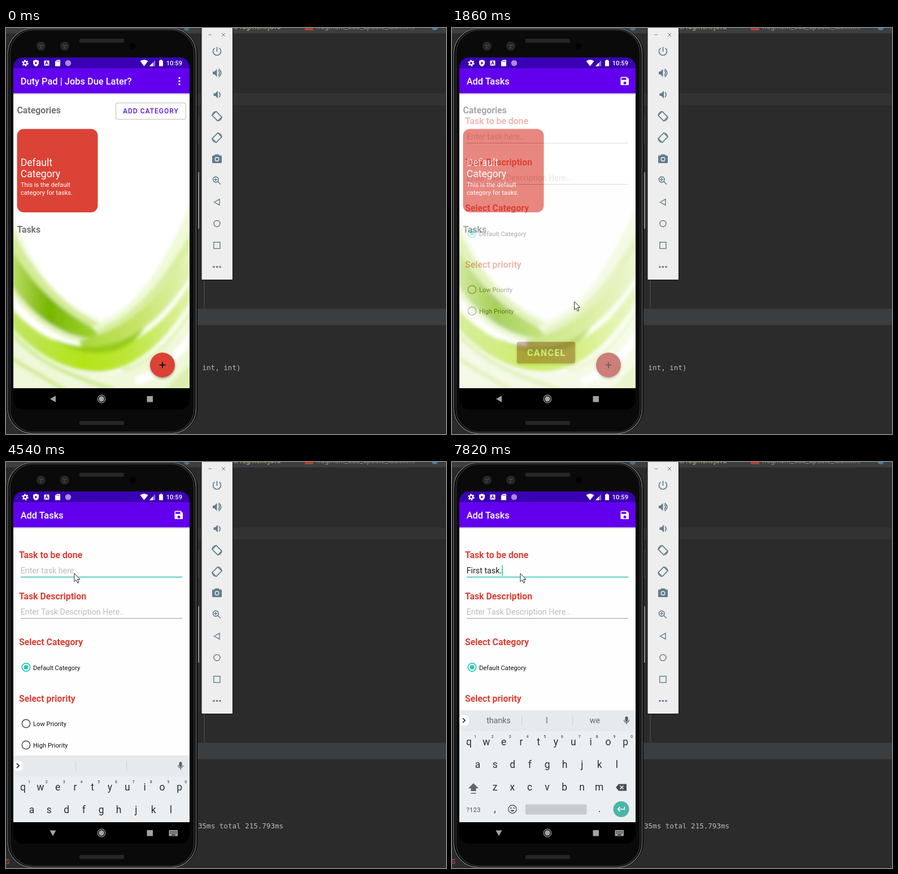
Animation of 779x718 px, one loop 8 s. Source, as an HTML page:

```html
<!DOCTYPE html>
<html lang="en">
<head>
<meta charset="utf-8">
<title>Task form demo</title>
<style>
html, body { margin: 0; width: 100%; height: 100%; overflow: hidden; background: #2b2b2b; }
svg { display: block; width: 779px; height: 718px; font-family: Roboto, sans-serif; }
text { white-space: pre; }
.mono { font: 12.55px "DejaVu Sans Mono", monospace; fill: #b4bcc0; }
.title { font-size: 16.4px; font-weight: 500; fill: #fff; }
.head { font-size: 15.84px; font-weight: 700; }
.field { font-size: 14.26px; }
.small { font-size: 11.2px; }
.hint { fill: #bdbdbd; }
.mid { text-anchor: middle; }
.line { fill: none; stroke-width: 1.7; }
</style>
</head>
<body>
<svg viewBox="0 0 779 718">
  <defs>
    <clipPath id="screen"><rect x="13" y="52" width="312" height="623" rx="17"/></clipPath>
    <clipPath id="content"><rect x="13" y="115" width="312" height="522"/></clipPath>
    <filter id="soft" x="-20%" y="-20%" width="140%" height="140%"><feGaussianBlur stdDeviation="3"/></filter>
    <filter id="shade" x="-30%" y="-30%" width="160%" height="170%"><feDropShadow dx="0" dy="2" stdDeviation="2" flood-opacity=".35"/></filter>
    <linearGradient id="bowl"><stop stop-color="#c2e46a"/><stop offset=".4" stop-color="#b3e418"/><stop offset=".65" stop-color="#bce63a"/><stop offset="1" stop-color="#e2f3b4"/></linearGradient>
    <linearGradient id="leaf"><stop stop-color="#bfe070"/><stop offset=".45" stop-color="#78b600"/><stop offset="1" stop-color="#a4d536"/></linearGradient>
    <linearGradient id="wing"><stop stop-color="#a9d636"/><stop offset=".5" stop-color="#c6e468"/><stop offset="1" stop-color="#e6f4bd"/></linearGradient>
    <linearGradient id="barShade" x2="0" y2="1"><stop stop-color="#000" stop-opacity=".22"/><stop offset="1" stop-color="#000" stop-opacity="0"/></linearGradient>
    <g id="turn"><rect x="-5" y="-7" width="10" height="14" transform="rotate(-45)"/><path d="M-8.500-2A9 9 0 0 1-3-8.300M8.500 2A9 9 0 0 1 3 8.300" stroke-width="1.300"/></g>
  </defs>

  <!-- editor -->
  <rect width="779" height="718" fill="#2b2b2b"/>
  <rect width="779" height="9.5" fill="#3c3f41"/>
  <g font-size="12.5" fill="#8b8f92">
    <circle cx="320" cy="0" r="5" fill="#4d7186"/>
    <text x="385" y="2" fill="#b5b46c">StatFragment.java</text>
    <rect x="529" y="-3" width="15" height="7" rx="1" fill="#b8402f"/>
    <text x="549" y="2">fragment_add_update_task.xml</text>
    <circle cx="759" cy="-2" r="6" fill="#4d7ea0"/>
  </g>
  <rect x="330" y="116" width="449" height="21" fill="#323232"/>
  <rect x="330" y="496.500" width="449" height="29" fill="#3b3e41"/>
  <path d="M351 446V496" stroke="#555"/>
  <text id="logA" class="mono" x="347.500"></text>
  <text id="logB" class="mono" x="340">35ms total 215.793ms</text>
  <text id="logC" x="-1" y="711" font-size="12" fill="#d0533f">S</text>

  <!-- phone body -->
  <rect x="1" y="0" width="338" height="718" rx="46" fill="#050505"/>
  <rect x="3" y="1" width="333.500" height="716" rx="44" fill="none" stroke="#6b6e70" stroke-width="1.500"/>
  <rect x="7" y="3.500" width="326" height="711" rx="41" fill="#0a0a0a" stroke="#333537" stroke-width="1.500"/>
  <path d="M341 155V205" stroke="#484848"/>
  <path d="M341 255V355" stroke="#aaa" stroke-width="1.500"/>
  <g fill="#262626">
    <rect x="130" y="19" width="79" height="7" rx="2"/><rect x="130" y="695" width="79" height="7" rx="2"/>
    <circle cx="62" cy="32" r="8"/><circle cx="104" cy="32" r="8"/>
    <circle cx="224" cy="32" r="5.500" fill="#020202"/>
    <path d="M59 30l3 2m2-3v3m-4 3h3m38-5l3 2m2-3v3m-4 3h3" stroke="#555" stroke-width="1.500"/>
  </g>

  <g clip-path="url(#screen)">
    <rect x="13" y="52" width="312" height="623" fill="#000"/>
    <rect x="13" y="115" width="312" height="522" fill="#fff"/>

    <g clip-path="url(#content)">
      <!-- list page -->
      <g filter="url(#soft)">
        <path d="M5 540C70 600 130 615 190 610C250 600 300 560 335 500V645H5Z" fill="#f0f8da"/>
        <path d="M5 310C40 420 90 490 170 516C130 530 50 490 5 390Z" fill="#f1f9db"/>
        <path d="M5 345C45 430 100 495 175 527C100 535 40 480 5 420Z" fill="#d3ec96"/>
        <path d="M172 516C240 490 290 400 335 290V395C290 480 230 540 150 545Z" fill="#f0f9d8"/>
        <path d="M165 530C240 505 290 425 335 350V375C290 460 240 525 160 545Z" fill="#d9eea0"/>
        <path d="M5 385C45 450 85 492 150 528C170 540 165 548 140 548C90 545 45 510 5 450Z" fill="url(#leaf)"/>
        <path d="M5 455C45 515 95 550 160 556" fill="none" stroke="#e3f3b8" stroke-width="9"/>
        <path d="M130 553C220 533 280 470 335 385V425C290 500 230 560 140 578Z" fill="url(#wing)"/>
        <path d="M5 490C60 555 120 572 180 568C250 555 300 500 335 435V470C290 545 240 600 170 608C100 610 45 570 5 525Z" fill="url(#bowl)"/>
        <path d="M80 548C130 574 195 568 245 530C215 582 140 590 80 548Z" fill="#96cb17"/>
        <path d="M5 535C55 590 100 610 190 640M5 580C40 605 75 620 110 645" fill="none" stroke="#cdea8a" stroke-width="7"/>
        <path d="M205 605C265 590 300 545 335 490" fill="none" stroke="#e0f2b0" stroke-width="7"/>
        <path d="M230 625C280 610 310 570 335 535" fill="none" stroke="#fff" stroke-width="14"/>
        <path d="M275 645L335 585V645Z" fill="#dcefae"/>
      </g>
      <g class="head" fill="#757575"><text x="19.500" y="151">Categories</text><text x="19.500" y="362">Tasks</text></g>
      <g id="addButton">
        <rect x="194.500" y="132.500" width="123.500" height="29" rx="3" fill="#fff" stroke="#cfcfcf" stroke-width="1.500"/>
        <text x="207" y="151.200" font-size="11.9" font-weight="500" letter-spacing="1.06" fill="#5b14e0">ADD CATEGORY</text>
      </g>
      <rect x="19.500" y="178.500" width="143" height="147.500" rx="12" fill="#db4336"/>
      <g fill="#fff">
        <g font-size="17.6"><text x="25.700" y="243.500">Default</text><text x="25.700" y="264.300">Category</text></g>
        <g font-size="11.09"><text x="26" y="281.300">This is the default</text><text x="26" y="294.500">category for tasks.</text></g>
      </g>
      <circle cx="277" cy="596" r="22" fill="#db4336" filter="url(#shade)"/>
      <circle id="press" cx="277" cy="596" r="22" opacity="0"/>
      <path d="M271.500 596h11m-5.500-5.500v11" stroke="#000" stroke-width="1.700"/>

      <!-- form page -->
      <g id="form">
        <rect x="13" y="115" width="312" height="522" fill="#fefefe"/>
        <g class="head" fill="#db3f34">
          <text x="23" y="170">Task to be done</text><text x="23" y="243">Task Description</text>
          <text x="23" y="324">Select Category</text><text x="23" y="423.500">Select priority</text>
        </g>
        <text id="hint" class="field hint" x="25.700" y="197.300">Enter task here..</text>
        <text id="entry" class="field" x="25.700" y="197.300" fill="#212121"><tspan id="done"></tspan><tspan id="typing" text-decoration="underline"></tspan></text>
        <rect id="caret" y="182.500" width="1.700" height="19" fill="#35c9ba"/>
        <text class="field hint" x="25.700" y="270.300">Enter Task Description Here..</text>
        <path id="rule" d="M26 203.500H312"/>
        <path d="M26 276.500H312" stroke="#9e9e9e"/>
        <g class="line" stroke="#5f5f5f">
          <circle cx="35.500" cy="363" r="7.200" stroke="#2dc7b8"/><circle cx="35.500" cy="462.500" r="7.200"/><circle cx="35.500" cy="500.500" r="7.200"/>
        </g>
        <circle cx="35.500" cy="363" r="4" fill="#2dc7b8"/>
        <g class="small" fill="#111"><text x="48" y="367.500">Default Category</text><text x="48" y="466.500">Low Priority</text><text x="48" y="504.700">High Priority</text></g>
        <rect x="115" y="555" width="103" height="38" rx="3" fill="#993368" filter="url(#shade)"/>
        <text x="133" y="580" font-size="15.84" font-weight="800" letter-spacing="1.4" fill="#fff">CANCEL</text>
      </g>
      <rect x="13" y="115" width="312" height="4" fill="url(#barShade)"/>

      <g id="keyboard" fill="#263238">
        <rect x="13" y="439" width="312" height="198" fill="#eceff1"/>
        <rect x="13" y="439" width="312" height="37" fill="#e6eaec"/>
        <circle cx="21" cy="457" r="9.500" fill="#fff"/>
        <path class="line" d="M19 453l4 4l-4 4" stroke="#222"/>
        <path d="M123.500 449v17m90-17v17" stroke="#cfd3d6"/>
        <g id="words" class="field mid" fill="#5f676c"></g>
        <rect x="306.500" y="450" width="5" height="9" rx="2.500" fill="#555e63"/>
        <path class="line" d="M304.500 456a4.500 4.500 0 0 0 9 0m-4.500 5v3" stroke="#555e63" style="stroke-width:1.300"/>
        <g id="keys" class="mid" font-size="17.5"></g>
        <path d="M38 568l9 9h-4.500v5h-9v-5H29zM33.500 585h9v1.500h-9z" fill="#5d666b"/>
        <path d="M290 575.500l5-6h14v12h-14z" fill="#454f54"/>
        <path d="M297.500 572.500l6 6m0-6l-6 6" stroke="#fff" stroke-width="1.400"/>
        <text class="mid" x="38" y="618.500" font-size="11.5" fill="#4b555a">?123</text>
        <circle class="line" cx="107" cy="614" r="7.200" stroke="#4b555a" style="stroke-width:1.400"/>
        <path d="M103.500 615.500h7a3.600 3.600 0 0 1-7 0zM103 611h2.500v2H103zm5.500 0h2.500v2h-2.500z" fill="#4b555a"/>
        <rect x="130" y="605.500" width="108.500" height="18" rx="3" fill="#c8cbce"/>
        <circle cx="299.500" cy="614" r="14" fill="#4ab5a9"/>
        <path class="line" d="M305.500 609.500v4.500h-12m4-4l-4 4l4 4" stroke="#fff"/>
      </g>
    </g>

    <!-- app and status bars -->
    <rect x="13" y="70.500" width="312" height="45" fill="#6200ee"/>
    <rect x="13" y="52" width="312" height="18.500" fill="#3a00b3"/>
    <text id="title" class="title" x="25.700" y="100"></text>
    <g id="menu" fill="#fff"><circle cx="307" cy="88.500" r="1.700"/><circle cx="307" cy="94" r="1.700"/><circle cx="307" cy="99.500" r="1.700"/></g>
    <g id="save"><path d="M300 86.500h9.500l3.500 3.500v9.500q0 1.500-1.500 1.500h-11.500q-1.500 0-1.500-1.500v-11.500q0-1.500 1.500-1.500z" fill="#fff"/><path d="M300 88.200h8.500v3.500H300z" fill="#6200ee"/><circle cx="306" cy="97.200" r="2.500" fill="#6200ee"/></g>
    <g fill="#fff">
      <circle class="line" cx="34" cy="62" r="3" stroke="#fff" style="stroke-width:2.200"/>
      <circle class="line" cx="34" cy="62" r="4.800" stroke="#fff" stroke-dasharray="2.5 2.530" style="stroke-width:2"/>
      <path d="M53 56l5 2v4q0 4-5 6q-5-2-5-6v-4z"/><path d="M51.500 59.500v5l4-2.500z" fill="#3a00b3"/>
      <rect x="67.500" y="57.500" width="9" height="9" rx="1"/><path d="M69.500 65l2.500-6l2.500 6m-4-2h3" class="line" stroke="#3a00b3" style="stroke-width:1.100"/>
      <path d="M90 56.500h6v11h-9v-8z"/><path d="M90 58v2m2-2v2m2-2v2" stroke="#3a00b3" stroke-width=".8"/>
      <circle cx="110" cy="62" r="5.300" fill="#a58bdb"/>
      <path d="M237.500 58.500q7-5 14 0l-7 9z"/>
      <path d="M254 67.500L264 57v10.500z" opacity=".45"/><path d="M254 67.500l6-6.300v6.300z"/>
      <path d="M271 57.500h2v-1.200h3v1.200h2v10h-7z"/>
      <text x="283.800" y="66" font-size="11.1" font-weight="500">10:59</text>
    </g>

    <!-- navigation bar -->
    <g fill="#a3a3a3">
      <path id="back"/>
      <circle cx="169" cy="656" r="4.800"/><circle class="line" cx="169" cy="656" r="6.800" stroke="#a3a3a3" style="stroke-width:1.200"/>
      <rect x="249.500" y="651" width="10.500" height="10.500"/>
      <g id="imeIcon"><rect x="288.500" y="651" width="15.500" height="10.500" rx="1"/><path d="M290.500 653.700h12m-12 2.800h12" stroke="#111" stroke-width="1.500" stroke-dasharray="1.5 1.100"/><path d="M293 659.500h6.500" stroke="#111" stroke-width="1.300"/></g>
    </g>
  </g>

  <!-- side toolbar -->
  <rect x="346" y="-1" width="55.500" height="446.500" fill="#eee" stroke="#101010"/>
  <g class="line" stroke="#5f7d8c">
    <path d="M358.500 12h5.500m18-3l6 6m0-6l-6 6" stroke="#777" style="stroke-width:1"/>
    <path d="M373.500 33.500v8.500m-4-6.500a7 7 0 1 0 8 0"/>
    <path d="M376 75q4 4 0 9m.5-11.500q8.500 7 0 14"/>
    <path d="M377 113.500q4 4.500 0 9"/>
    <use href="#turn" transform="translate(373.500 156)"/>
    <use href="#turn" transform="translate(373.500 194) scale(-1 1)"/>
    <circle cx="371.300" cy="268" r="4.800"/><path d="M375 271.500l5 5m-11.500-8.500h5.600m-2.800-2.800v5.600" style="stroke-width:1.500"/>
    <path d="M368.500 308l9.500-5.200v10.400z" style="stroke-width:1.400"/>
    <circle cx="373.500" cy="346" r="5.500" style="stroke-width:1.400"/>
    <rect x="367.800" y="378.800" width="11.200" height="11.200" style="stroke-width:1.400"/>
  </g>
  <g fill="#5f7d8c">
    <path d="M366 77h3l4.500-4.500v14l-4.500-4.500h-3zM367.500 115.500h3l4.500-4.500v13.500l-4.500-4.500h-3z"/>
    <path d="M366.500 225.500h2.500l1.500-2h6l1.500 2h2.500q1.500 0 1.500 1.500v10.500q0 1.500-1.500 1.500h-14q-1.500 0-1.500-1.500v-10.500q0-1.500 1.500-1.500z"/>
    <circle cx="373.500" cy="232" r="4" fill="#eee"/><circle cx="373.500" cy="232" r="2.500"/>
    <circle cx="368" cy="422.500" r="1.800"/><circle cx="373.500" cy="422.500" r="1.800"/><circle cx="379" cy="422.500" r="1.800"/>
  </g>

  <path id="pointer" d="M0 0V14.500L3.300 11.500L5.700 17L8 16L5.700 10.500H10z" fill="#fff" stroke="#111" stroke-width=".9"/>
</svg>
<script>
const $ = id => document.getElementById(id);
const clamp = v => Math.max(0, Math.min(1, v));
const easeOut = v => 1 - (1 - v) ** 2;
const show = (id, on) => $(id).setAttribute('visibility', on ? 'visible' : 'hidden');
const set = (id, text) => { if ($(id).textContent !== text) $(id).textContent = text; };

function addText(parent, x, y, text, size) {
  const el = document.createElementNS('http://www.w3.org/2000/svg', 'text');
  el.setAttribute('x', x);
  el.setAttribute('y', y);
  if (size) el.setAttribute('font-size', size);
  el.textContent = text;
  return parent.appendChild(el);
}

const KEY_GAP = 30.8;
[['qwertyuiop', 30, 500.5], ['asdfghjkl', 45.5, 540.5], ['zxcvbnm', 76, 580.5]].forEach(([row, x, y], r) =>
  [...row].forEach((key, i) => {
    addText($('keys'), x + i * KEY_GAP, y, key);
    if (r === 0) addText($('keys'), x + 11 + i * KEY_GAP, 487.5, (i + 1) % 10, 7);
  }));
addText($('keys'), 76, 619, ',');
addText($('keys'), 261, 619, '.');
const words = [82.5, 168, 253].map(x => addText($('words'), x, 462.3, ''));

// time, committed text, text being composed, suggestions, caret
const typing = [
  [0, '', '', '', 0],
  [3640, '', '', '', 1],
  [4290, '', '', '', 0],
  [4750, '', 'F', 'F For From', 1],
  [5010, '', 'Fi', 'Fi First Five', 1],
  [5230, '', 'Firs', 'Firs First Firstly', 1],
  [5540, '', 'First', 'Firsts First Firsthand', 1],
  [5700, 'First ', '', 'time thing day', 1],
  [6160, 'First ', '', 'time thing day', 0],
  [6330, 'First ', 't', 't time day', 1],
  [6480, 'First ', 'ta', 'ta time day', 1],
  [6730, 'First ', 'tas', 'tas task tasks', 1],
  [7200, 'First ', 'task', 'task tasks taste', 1],
  [7750, 'First task', '', 'and for to', 1],
  [7820, 'First task.', '', 'thanks I we', 1],
];

// time, x, y
const pointerPath = [
  [170, 408, 672], [940, 274, 597], [1800, 274, 597], [2020, 154, 360],
  [2100, 150, 345], [2410, 122, 207], [3030, 122, 206], [3330, 121, 197],
];

function pointerAt(t) {
  const next = pointerPath.findIndex(p => p[0] > t);
  if (next < 1) return pointerPath.at(next < 0 ? -1 : 0).slice(1);
  const [a, b] = [pointerPath[next - 1], pointerPath[next]];
  const k = easeOut((t - a[0]) / (b[0] - a[0]));
  return [a[1] + (b[1] - a[1]) * k, a[2] + (b[2] - a[2]) * k];
}

function draw(t) {
  const onForm = t >= 1800, focused = t >= 3640, imeOpen = t >= 4290;

  set('title', t < 1640 ? 'Duty Pad | Jobs Due Later?' : 'Add Tasks');
  show('addButton', t < 1640);
  show('menu', !onForm);
  show('save', onForm);
  $('press').setAttribute('opacity', 0.2 * clamp((t - 1250) / 300));
  $('form').setAttribute('opacity', clamp((t - 1770) / 250));

  const scrolled = t >= 1870, cleared = t >= 4040;
  set('logA', cleared ? '' : 'int, int)');
  $('logA').setAttribute('y', scrolled ? 563 : 605);
  $('logB').setAttribute('y', cleared ? 648 : 690);
  show('logB', scrolled);
  show('logC', scrolled);

  const [, done, composing, suggestions, caret] = typing.findLast(s => s[0] <= t);
  set('done', done);
  set('typing', composing);
  show('hint', !done && !composing);
  const shown = suggestions.split(' ');
  words.forEach((word, i) => word.textContent = shown[i] || '');
  words[1].setAttribute('font-weight', composing ? 700 : 400);
  show('caret', caret);
  $('caret').setAttribute('x', 25.7 + (done || composing ? $('entry').getComputedTextLength() : 0));
  $('rule').setAttribute('stroke', focused ? '#2dbfb1' : '#9e9e9e');
  $('rule').setAttribute('stroke-width', focused ? 1.5 : 1);

  $('back').setAttribute('d', imeOpen ? 'M77.500 651.500h11l-5.500 10z' : 'M78 656l10-5.800v11.600z');
  show('imeIcon', imeOpen);
  const slide = easeOut(clamp((t - 4420) / 330));
  $('keyboard').setAttribute('transform', `translate(0 ${200 * (1 - slide)})`);

  show('pointer', t >= 170);
  $('pointer').setAttribute('transform', `translate(${pointerAt(t)})`);
}

function tick() {
  draw(performance.now() % 8000);
  requestAnimationFrame(tick);
}
tick();
</script>
</body>
</html>
```
